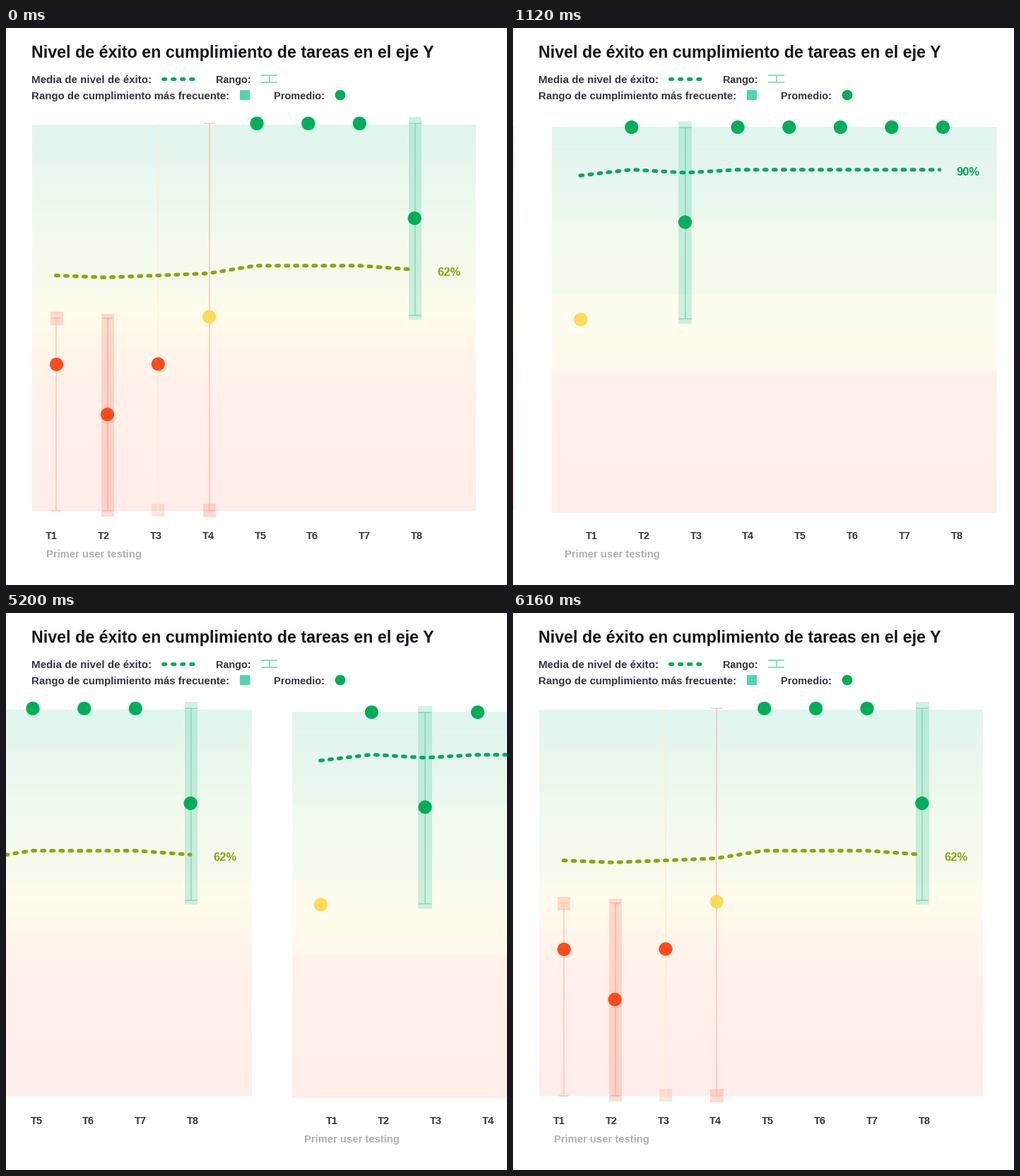
Write a matplotlib script that moves like this. It is 709 px wide and 789 px high and loops after 9.6 s.

```python
import numpy as np
import matplotlib.pyplot as plt
from matplotlib.animation import FuncAnimation
from matplotlib.colors import to_rgb
from matplotlib.patches import Circle, Rectangle
from matplotlib.transforms import Affine2D

W, H, DPI = 709, 789, 100
STEP, LOOP = 80, 9600
PX = 72 / DPI  # one pixel in points

GREEN, MINT, RED, YELLOW, OLIVE = "#00ae5a", "#4fd2a8", "#ff4a1c", "#ffda58", "#8aa60a"
INK, LABEL, MUTED = "#14141c", "#35343f", "#b0b0b9"

plt.rcParams["font.family"] = "Liberation Sans"
fig = plt.figure(figsize=(W / DPI, H / DPI), dpi=DPI, facecolor="white")
ax = fig.add_axes([0, 0, 1, 1])


def text(x, y, s, size, color, tr=None, ha="left"):
    ax.text(x, y, s, fontsize=size * PX, color=color, weight="bold", ha=ha,
            va="baseline", transform=tr or ax.transData, zorder=6)


def rect(x0, y0, x1, y1, color, tr=None, alpha=1.0):
    ax.add_patch(Rectangle((x0, y0), x1 - x0, y1 - y0, fc=color, lw=0,
                           alpha=alpha, transform=tr or ax.transData, zorder=2))


def dot(x, y, color, tr=None, r=9.6):
    ax.add_patch(Circle((x, y), r, fc=color, lw=0,
                        transform=tr or ax.transData, zorder=5))


def line(xs, ys, color, tr=None, lw=1.6, alpha=1.0):
    ax.plot(xs, ys, color=color, lw=lw * PX, alpha=alpha,
            solid_capstyle="butt", transform=tr or ax.transData, zorder=3)


def dashes(points, color, tr=None, on=3.8, off=9.25, lw=5.2):
    xs, ys = zip(*points)
    ax.plot(xs, ys, color=color, lw=lw * PX, ls=(0, (on / lw, off / lw)),
            dash_capstyle="round", transform=tr or ax.transData, zorder=4)


def whisker(x, y0, y1, color, tr, alpha=1.0, cap=7):
    line([x, x], [y0, y1], color, tr, alpha=alpha)
    for y in (y0, y1):
        line([x - cap, x + cap], [y, y], color, tr, alpha=alpha)


def gradient(x0, x1, top, bottom, stops, tr):
    ys, colors = zip(*stops)
    rgb = np.array([to_rgb(c) for c in colors])
    rows = np.arange(top, bottom) + 0.5
    img = np.stack([np.interp(rows, ys, rgb[:, k]) for k in range(3)], axis=-1)
    ax.imshow(img[:, None, :], extent=(x0, x1, bottom, top), aspect="auto",
              interpolation="nearest", transform=tr, zorder=1)


def axis_labels(x, tr):
    for i in range(8):
        text(x + 73.86 * i, 724, f"T{i + 1}", 14.6, LABEL, tr, ha="center")
    text(57, 750, "Primer user testing", 14.9, MUTED, tr)


def header():
    text(36, 42, "Nivel de éxito en cumplimiento de tareas en el eje Y", 23.3, INK)
    text(36, 77.5, "Media de nivel de éxito:", 15.1, LABEL)
    text(297, 77.5, "Rango:", 14.4, LABEL)
    text(36, 100.5, "Rango de cumplimiento más frecuente:", 15, LABEL)
    text(379, 100.5, "Promedio:", 14.5, LABEL)
    dashes([(221.5, 72), (264.5, 72)], GREEN, on=3.2, off=9.9)
    for y in (67, 77):
        line([361, 384], [y, y], "#7fdcbf", lw=1.8)
    line([372.5, 372.5], [67, 77], "#7fdcbf", lw=1.8)
    rect(331, 88, 345, 102, "#4fd6ae")
    dot(473, 95, GREEN, r=7.4)


def first_panel(tr):
    gradient(36.5, 664.3, 137, 684, [
        (137, "#e0f6f0"), (200, "#e9f7ed"), (290, "#f2faee"), (370, "#f9fbed"),
        (395, "#fffdec"), (430, "#fffaec"), (475, "#fff4eb"), (550, "#fff0ea"),
        (684, "#ffede9")], tr)
    pink, rose = "#ff9a86", "#ffb9ab"
    rect(62.5, 402, 80.5, 420.5, pink, tr, 0.36)
    whisker(71.3, 411, 684, rose, tr, 0.75)
    rect(135, 404.5, 153, 692, pink, tr, 0.34)
    whisker(143.8, 411, 684, "#ffa595", tr, 0.7)
    line([215, 215], [135, 684], "#fdeecb", tr, lw=2, alpha=0.6)
    rect(206, 674, 224, 692, pink, tr, 0.26)
    whisker(287.6, 135, 684, rose, tr, 0.8, cap=8)
    rect(278.5, 674, 297, 692.5, pink, tr, 0.36)
    for x in (355, 427.8, 500.3):
        rect(x - 9, 126, x + 9, 144.5, MINT, tr, 0.2)
        dot(x, 135.2, GREEN, tr)
    rect(569.7, 126, 588, 413, MINT, tr, 0.28)
    whisker(578.7, 134.5, 407, "#58c4a0", tr, 0.5, cap=9)
    for x, y, c in ((71.5, 476.5, RED), (143.5, 547.5, RED), (215.3, 476, RED),
                    (287.5, 409, YELLOW), (578.2, 269.5, GREEN)):
        dot(x, y, c, tr)
    dashes([(70.5, 350.5), (139, 353.3), (215, 350.5), (287, 347.5), (353, 336.7),
            (500, 336.7), (578, 342.3)], OLIVE, tr)
    text(610, 351, "62%", 16.6, OLIVE, tr)
    axis_labels(64.5, tr)


def second_panel(tr):
    gradient(39.6, 668.7, 140, 687, [
        (140, "#e0f6f0"), (200, "#e7f7ee"), (268, "#ebf8ee"), (276, "#f2faef"),
        (377, "#f6faee"), (379, "#fefdee"), (430, "#fffcee"), (483, "#fffaed"),
        (486, "#fff3eb"), (570, "#fff0ea"), (687, "#ffeee9")], tr)
    rect(218, 131.5, 237.5, 418.5, MINT, tr, 0.28)
    whisker(227.7, 140.5, 412, "#58c4a0", tr, 0.5, cap=9)
    for x in (152, 302.2, 375, 447.5, 520, 592.7):
        dot(x, 140.5, GREEN, tr)
    dot(80, 413, YELLOW, tr)
    dot(227.7, 275, GREEN, tr)
    dashes([(79.3, 209), (152, 200.6), (228, 205), (302, 200.8), (588, 200.8)],
           "#00a862", tr)
    text(612, 209, "90%", 16.6, "#00a45e", tr)
    axis_labels(95.5, tr)


def bezier(t, x1, y1, x2, y2):
    s = np.linspace(0, 1, 400)
    xs, ys = (3 * (1 - s) ** 2 * s * p + 3 * (1 - s) * s ** 2 * q + s ** 3
              for p, q in ((x1, x2), (y1, y2)))
    return float(np.interp(t, xs, ys))


def offsets(ms):
    """Horizontal shift of both panels: slide left, hold, slide back."""
    gap = 678.5
    if ms < 4800:
        a = -gap * bezier((ms - 52) / 1324, 0.35, 0.1, 0.25, 1)
        return a, a + gap
    u = bezier((ms - 4798) / 1298, 0.25, 0.1, 0.25, 1)
    return -gap + (gap + 0.7) * u, 686.5 * u


shifts = Affine2D(), Affine2D()
header()
first_panel(shifts[0] + ax.transData)
second_panel(shifts[1] + ax.transData)
ax.set_xlim(0, W)
ax.set_ylim(H, 0)
ax.axis("off")


def update(n):
    for shift, dx in zip(shifts, offsets(n * STEP)):
        shift.clear().translate(dx, 0)
    return []


anim = FuncAnimation(fig, update, frames=LOOP // STEP, interval=STEP,
                     repeat=True, repeat_delay=0, blit=False)
plt.show()
```
